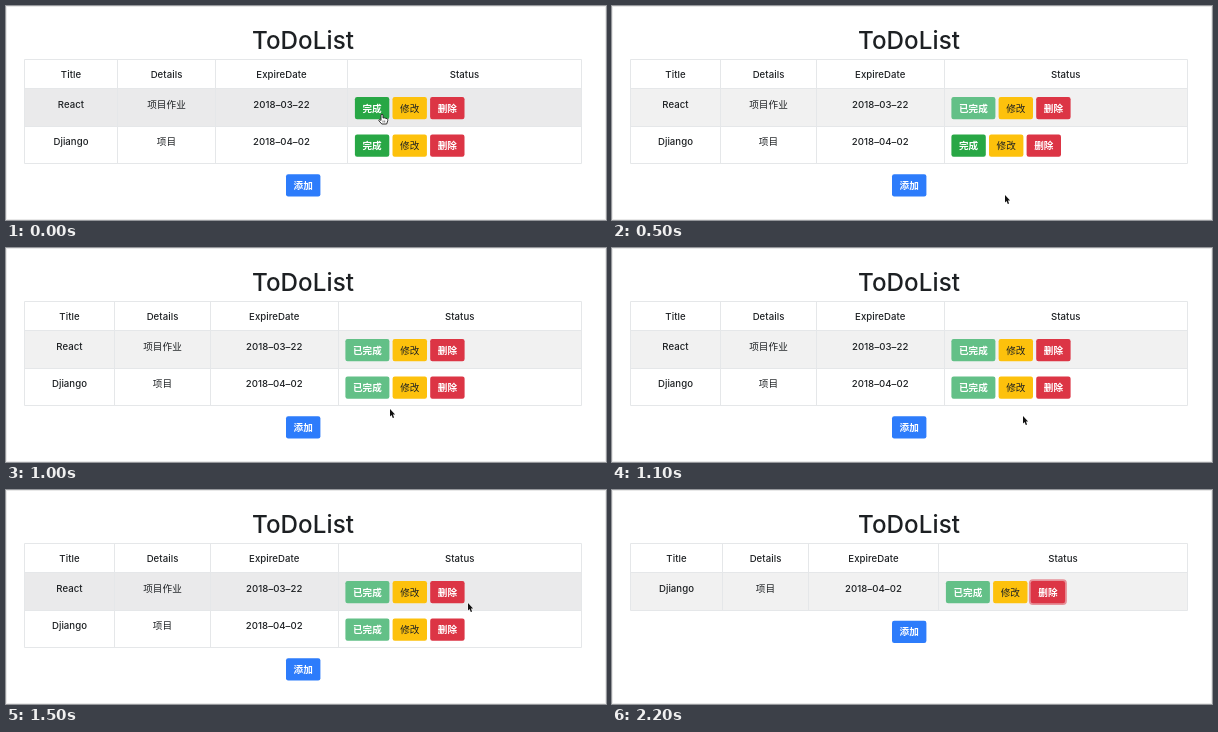
An HTML page that plays this animation: 600x214 px, repeating every 2400 ms.

```html
<!DOCTYPE html>
<html lang="zh-CN">
<head>
<meta charset="utf-8">
<title>ToDoList</title>
<style>
html, body { margin: 0; width: 100%; height: 100%; overflow: hidden; background: #fff; }
svg { display: block; }
text { font: 500 9.6px Inter, "Noto Sans CJK SC", "Noto Sans CJK", sans-serif; letter-spacing: .06px; text-anchor: middle; fill: #1d2023; }
.title { font-size: 24.2px; }
.light { fill: #fff; font-weight: 700; }
</style>
</head>
<body>
<svg id="stage" width="600" height="214" viewBox="0 0 600 214"></svg>
<script>
const stage = document.getElementById('stage');
const STEP = 100, LOOP = 2400;
const LEFT = 18.5, RIGHT = 575.5, TOP = 53.5, BODY = 82.8, ROW = 37.5;
const BUTTON_H = 22.2, GAP = 3.2;

// pointer tip at each step; the pointer leaves after the last one
const path = [
  [376, 108], [376, 108], [376, 108], [378, 112], [388, 176], [393, 189], [393, 189],
  [382, 170], [363, 143], [363, 143], [384, 161], [411, 168], [438, 165], [468, 143],
  [478, 130], [462, 113], [443, 98], [443, 98], [443, 98], [455, 116], [470, 146], [482, 172]
];
const FIRST_DONE = 2, SECOND_DONE = 9, DELETED = 17;

const tasks = [
  ['React', '项目作业', '2018–03–22'],
  ['Djiango', '项目', '2018–04–02']
];

const rect = (x, y, w, h, fill, more = '') =>
  `<rect x="${x}" y="${y}" width="${w}" height="${h}" fill="${fill}" ${more}/>`;
const label = (x, y, s, cls = '') => `<text x="${x}" y="${y}" class="${cls}">${s}</text>`;
const line = d => `<path d="${d}" stroke="#e5e7e9" fill="none"/>`;
const crisp = v => Math.floor(v) + 0.5;
const buttonWidth = s => 15.2 + 9.6 * s.length;

function button(x, y, s, fill, cls = 'light', more = '') {
  const w = buttonWidth(s);
  return rect(x, y, w, BUTTON_H, fill, 'rx="2.2" ' + more) + label(x + w / 2, y + 14.7, s, cls);
}

function pointer([x, y], hand) {
  const shape = hand
    ? `<path d="M-1 .8Q0-.6 1 .8V4L2.3 3.8 3.6 4.3 5 4.6Q5.9 5 5.8 6.5L4.7 10H-.2L-3.2 6.7Q-3.2 5.2-1.9 5.7L-1 6.5Z" fill="#fff" stroke="#222" stroke-width=".9"/>
       <path d="M1 6.5V8.5M2.7 6.5V8.5" stroke="#222" stroke-width=".6"/>`
    : `<path d="M0 0V7.6L1.6 6.1 2.8 9 4.1 8.4 2.9 5.5H5.1Z" fill="#111" stroke="#fff" stroke-width=".8" paint-order="stroke"/>`;
  return `<g transform="translate(${x} ${y})">${shape}</g>`;
}

function draw(step) {
  const deleted = step >= DELETED;
  const cols = deleted ? [LEFT, 110.5, 196.5, 326.5, RIGHT]
    : step >= FIRST_DONE ? [LEFT, 108.5, 204.5, 332, RIGHT]
    : [LEFT, 111.5, 209.5, 341.5, RIGHT];
  const mid = i => (cols[i] + cols[i + 1]) / 2;
  const rows = deleted ? [1] : [0, 1];
  const bottom = BODY + ROW * rows.length;
  const tip = path[step];
  let hand = false, buttons = '';

  let out = rect(0.5, 0.5, 599, 213, '#fff', 'stroke="#e8e8e8"') + label(297, 43.3, 'ToDoList', 'title');
  ['Title', 'Details', 'ExpireDate', 'Status'].forEach((s, i) => out += label(mid(i), 72.3, s));
  let lines = line(`M${LEFT} 82.5H${RIGHT}`);

  rows.forEach((task, n) => {
    const y = BODY + n * ROW;
    const hover = tip && tip[1] >= y && tip[1] < y + ROW;
    out += rect(LEFT, y, RIGHT - LEFT, ROW, hover ? '#eaeaeb' : n ? '#fff' : '#f1f1f1');
    tasks[task].forEach((s, i) => out += label(mid(i), y + 19, s));

    const done = step >= (task ? SECOND_DONE : FIRST_DONE);
    const by = y + 8.2;
    let x = cols[3] + 7.4;
    // draws the next button in the row and tells whether the pointer is on it
    const add = (s, fill, hotFill, cls, more) => {
      const w = buttonWidth(s);
      const over = tip && tip[0] >= x && tip[0] < x + w && tip[1] >= by && tip[1] < by + BUTTON_H;
      buttons += button(x, by, s, over ? hotFill : fill, cls, more);
      x += w + GAP;
      return over;
    };

    const onDone = done ? (add('已完成', '#63c087', '#63c087'), false)
      : add('完成', '#28a745', step ? '#219039' : '#28a745');
    add('修改', '#fdc10c', '#fdc10c', '');
    const ring = deleted ? 'stroke="#dc3545" stroke-opacity=".5" stroke-width="3.6" paint-order="stroke"' : '';
    const onDelete = add('删除', '#dc3545', '#c62135', 'light', ring);
    hand ||= onDone || onDelete;
    lines += line(`M${LEFT} ${crisp(y + ROW)}H${RIGHT}`);
  });

  lines += line(`M${LEFT} ${TOP}H${RIGHT}`) + cols.map(x => line(`M${crisp(x)} ${TOP}V${crisp(bottom)}`)).join('');
  out += lines + buttons + button(280, bottom + 10.4, '添加', '#2d7cfb');
  if (tip) out += pointer(tip, hand);
  stage.innerHTML = out;
}

let shown = -1;
function tick() {
  const step = Math.floor(performance.now() % LOOP / STEP);
  if (step !== shown) draw(shown = step);
  requestAnimationFrame(tick);
}
tick();
</script>
</body>
</html>
```
